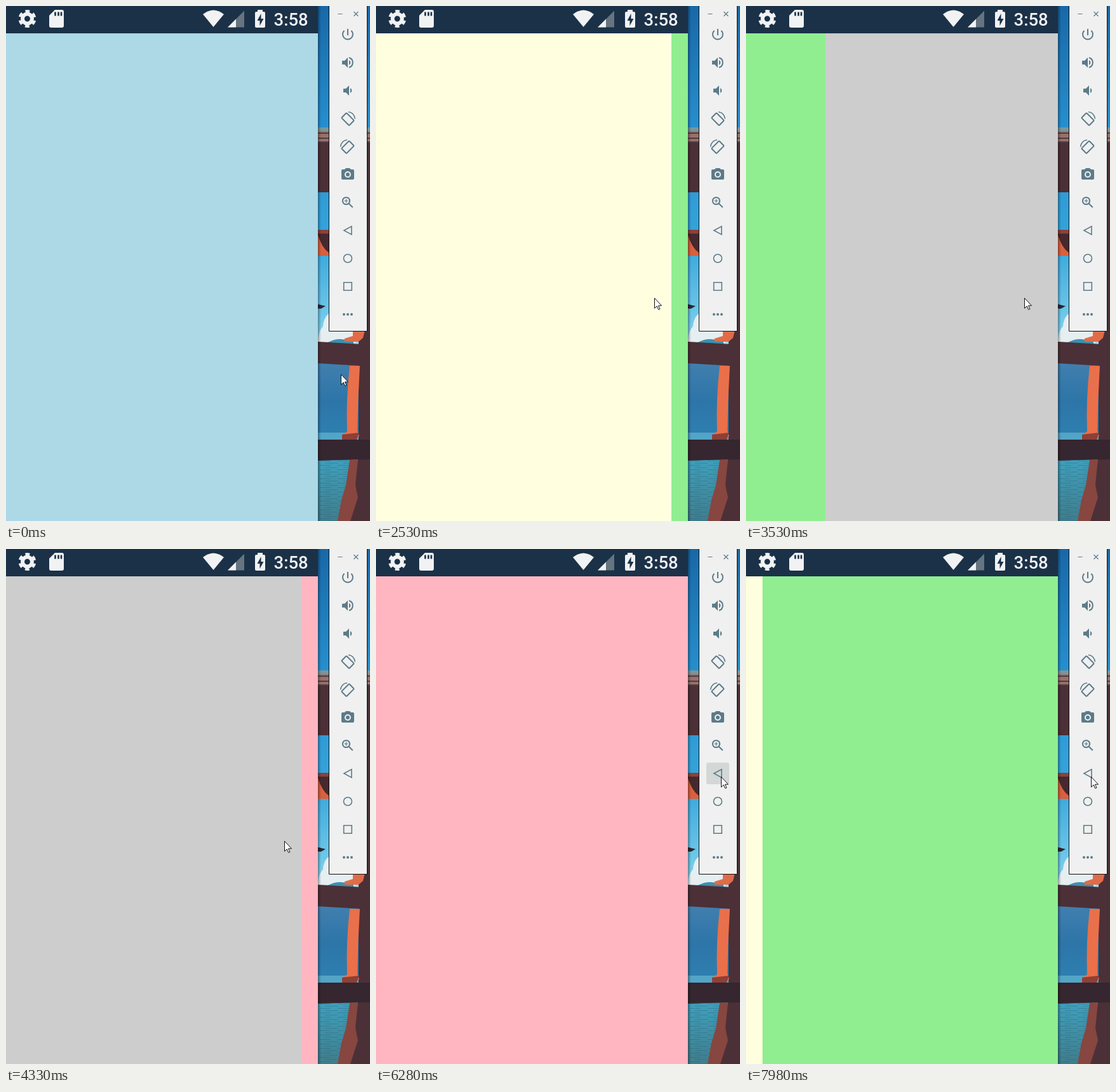
An HTML page that plays this animation: 573x810 px, repeating every 8 s.

```html
<!DOCTYPE html>
<html lang="en">
<head>
<meta charset="utf-8">
<title>Page slides</title>
<style>
  html, body { margin: 0; height: 100%; overflow: hidden; }
  svg { display: block; overflow: hidden; }
  text { font: 500 27.5px Roboto, sans-serif; }
  .line { fill: none; stroke: #5c7b89; stroke-width: 2; }
</style>
</head>
<body>
<svg width="573" height="810">
  <defs>
    <linearGradient id="sky" x2="0" y2="1">
      <stop stop-color="#1868a8"/><stop offset=".36" stop-color="#268fce"/>
      <stop offset=".7" stop-color="#36a5dc"/><stop offset=".93" stop-color="#74cbea"/><stop offset="1" stop-color="#a5dcec"/>
    </linearGradient>
    <linearGradient id="haze" x2="0" y2="1">
      <stop stop-color="#417fae"/><stop offset=".55" stop-color="#2d75a8"/><stop offset="1" stop-color="#2e7fb0"/>
    </linearGradient>
    <linearGradient id="sea" x2="0" y2="1">
      <stop stop-color="#3fa0bd"/><stop offset="1" stop-color="#407d8c"/>
    </linearGradient>
    <linearGradient id="shade">
      <stop stop-color="#000" stop-opacity=".35"/><stop offset="1" stop-color="#000" stop-opacity="0"/>
    </linearGradient>
    <pattern id="ripple" width="29" height="7" patternUnits="userSpaceOnUse">
      <path stroke="#255f79" stroke-opacity=".4" d="M0 1.5H18M9 5H29"/>
    </pattern>
  </defs>

  <!-- scenery -->
  <g>
    <path fill="url(#sky)" d="M491 0h82v535h-82z"/>
    <path fill="#78969b" d="M491 191h82v6h-82z"/>
    <path fill="#96716b" d="M491 197h82v18h-82z"/>
    <path stroke="#513b40" stroke-width="2" d="M491 200h82M491 208h82M491 214h82"/>
    <path fill="#4b3037" d="M491 215h82v78h-82z"/>
    <path fill="#d9603f" d="M491 360h17v33h-17z"/>
    <path fill="#8b4238" d="M491 352h17v9h-17z"/>
    <path fill="#45292e" d="M491 358h17v30q-11-8-17-28z"/>
    <path fill="#2c2730" d="M491 469l12 3-7 4h-5z"/>
    <path fill="#e5eef1" d="M491 524q2-14 8-20 1-14 9-20v-9h42v55h-59z"/>
    <path fill="#3e8fae" d="M503 531q14-8 24-7t20 0v9z"/>
    <path fill="url(#haze)" d="M491 560h70v112h-70z"/>
    <path fill="#53a5c6" d="M491 671h70v12h-70z"/>
    <path fill="url(#sea)" d="M491 712h82v98h-82z"/>
    <path fill="url(#ripple)" d="M491 712h82v98h-82z"/>
    <path fill="#4b3038" d="M555 510h18v300h-32l14-105zM568 215h5v297h-5z"/>
    <path fill="#e06c49" d="M546 510h19l-3 12-7 6h-22v-5l13-4z"/>
    <path fill="#4b3037" d="M491 528l70 4v34l-70-4z"/>
    <path fill="#e9704b" d="M541 566h16q-3 50-4 102l3 8-6 6h-21v-7l8-6q-2-50 4-103z"/>
    <path fill="#8d4038" d="M529 674l27-3-4 11h-23z"/>
    <path fill="#35262f" d="M491 682h82v31l-82 2z"/>
    <path fill="#87463f" d="M541 714l13-1-4 40 4 20-12 37h-20l6-33 7-23z"/>
    <path fill="url(#shade)" d="M491 0h5v810h-5z"/>
  </g>

  <!-- phone screen -->
  <svg width="491" height="810">
    <rect id="page" y="43" width="491" height="767"/>
    <rect id="next" y="43" width="491" height="767"/>
    <path fill="#1b3148" d="M0 0h491v43H0z"/>
    <g fill="#f1f2f3">
      <g transform="translate(33.5 20)" fill="none" stroke="#f1f2f3">
        <circle r="7.5" stroke-width="6"/>
        <circle r="11.5" stroke-width="5" stroke-dasharray="6.5 5.543" transform="rotate(13.8)"/>
      </g>
      <path d="M77 6h11q3 0 3 3v22q0 3-3 3H71q-3 0-3-3V15z"/>
      <path stroke="#1b3148" stroke-width="2.6" d="M77.5 9.5v6M82.5 9.5v6M87 9.5v6"/>
      <path d="M326.5 33L310 13q16.5-13 33 0z"/>
      <path fill="#66747f" d="M349 33.5l26-26v26z"/>
      <path d="M349 33.5l13-13v13z"/>
      <path d="M396 9V6h8v3h2q2 0 2 2v21q0 2-2 2h-12q-2 0-2-2V11q0-2 2-2z"/>
      <path fill="#1b3148" d="M401.5 12l-6 11h4v8l6-11h-4z"/>
      <text x="421.5" y="30.5">3:58</text>
    </g>
  </svg>

  <!-- emulator toolbar -->
  <path fill="#f0f0f0" stroke="#111" d="M508.5-1h60v512.5h-60z"/>
  <rect id="press" x="520" y="336" width="36" height="34" rx="3" fill="#d3d7d6"/>
  <path class="line" style="stroke-width:1.2" d="M522.5 12.5h7M547.5 9l7 7m0-7l-7 7"/>
  <g fill="#5c7b89">
    <path class="line" d="M538 36v10M532.5 38.700a8 8 0 1 0 11 0"/>
    <path d="M529 86h4l5-5v16l-5-5h-4zM540 85a4.500 4.500 0 0 1 0 8z"/>
    <path class="line" d="M540 81.300a8 8 0 0 1 0 15.400"/>
    <path d="M531 130h4l5-5v16l-5-5h-4zM542 129a4.500 4.500 0 0 1 0 8z"/>
    <g id="rotate" class="line">
      <rect x="-5.5" y="-8.5" width="11" height="17" rx="1" transform="translate(538 178) rotate(-45)"/>
      <path style="stroke-width:1.5" d="M539 166.500q9 1 10.500 11"/>
    </g>
    <use href="#rotate" transform="matrix(-1 0 0 1 1076 44)"/>
    <path d="M535 255h6l2 2h3q2 0 2 2v12q0 2-2 2h-16q-2 0-2-2v-12q0-2 2-2h3z"/>
    <circle cx="538" cy="265" r="4" stroke="#f0f0f0" stroke-width="2"/>
    <circle class="line" cx="535.5" cy="306.5" r="5.6"/>
    <path class="line" d="M539.8 310.8l6 6"/>
    <path class="line" style="stroke-width:1.2" d="M532.5 306.5h6M535.5 303.5v6"/>
    <g class="line" style="stroke-width:1.6">
      <path d="M532 353l12-6.500v13z"/>
      <circle cx="538" cy="397" r="6.5"/>
      <path d="M531.7 434.700h12.600v12.600h-12.600z"/>
    </g>
    <circle cx="532" cy="485" r="2"/><circle cx="538" cy="485" r="2"/><circle cx="544" cy="485" r="2"/>
  </g>
  <path id="cursor" fill="#fff" stroke="#111" d="M.5.5v16l3.700-3.500 2.500 5.500 2.300-1-2.500-5.300h5z"/>
</svg>
<script>
const LOOP = 8000, WIDTH = 491;
const [blue, yellow, green, gray, pink] = ['#add8e6', '#ffffe0', '#90ee90', '#cdcdcd', '#ffb6c1'];
// start time, old page, new page, side the new page enters from
const slides = [
  [0, blue, blue, 1], [1740, blue, yellow, 1], [2530, yellow, green, 1], [3410, green, gray, 1],
  [4330, gray, pink, 1], [6520, pink, gray, -1], [7298, gray, green, -1], [7980, green, yellow, -1]
];
const presses = [[6280, 6400], [7060, 7240], [7750, 7920]];
const [page, next, press, cursor] = ['page', 'next', 'press', 'cursor'].map(id => document.getElementById(id));

const ease = x => (1 - Math.cos(Math.PI * Math.min(1, x))) / 2;
// progress held in n visible steps, the first at start and the last at end
const stepped = (t, start, end, n) =>
  Math.max(0, Math.min(n, Math.floor((t - start) / (end - start) * (n - 1) + 1e-6) + 1)) / n;
const bezier = (points, s) => [0, 1].map(i =>
  Math.round((1 - s) ** 2 * points[0][i] + 2 * s * (1 - s) * points[1][i] + s * s * points[2][i]));

function cursorAt(t) {
  if (t < 60) return [527, 579];
  if (t < 5690) return bezier([[526, 579], [558, 592], [438, 459]], ease(stepped(t, 300, 1070, 13)));
  return bezier([[438, 459], [570, 400], [543, 358]], ease(stepped(t, 5690, 6220, 10)));
}

function draw(t) {
  const [start, from, to, side] = slides.findLast(s => s[0] <= t);
  const step = Math.floor((t - start) / 57.5 + 1e-6);
  const shown = ease(0.148 + 0.258 * step);
  page.setAttribute('fill', from);
  next.setAttribute('fill', to);
  next.setAttribute('x', Math.round(side * WIDTH * (1 - shown)));
  press.style.display = presses.some(([a, b]) => t >= a && t < b) ? '' : 'none';
  cursor.setAttribute('transform', `translate(${cursorAt(t)})`);
}

function tick() {
  draw(performance.now() % LOOP);
  requestAnimationFrame(tick);
}
tick();
</script>
</body>
</html>
```
